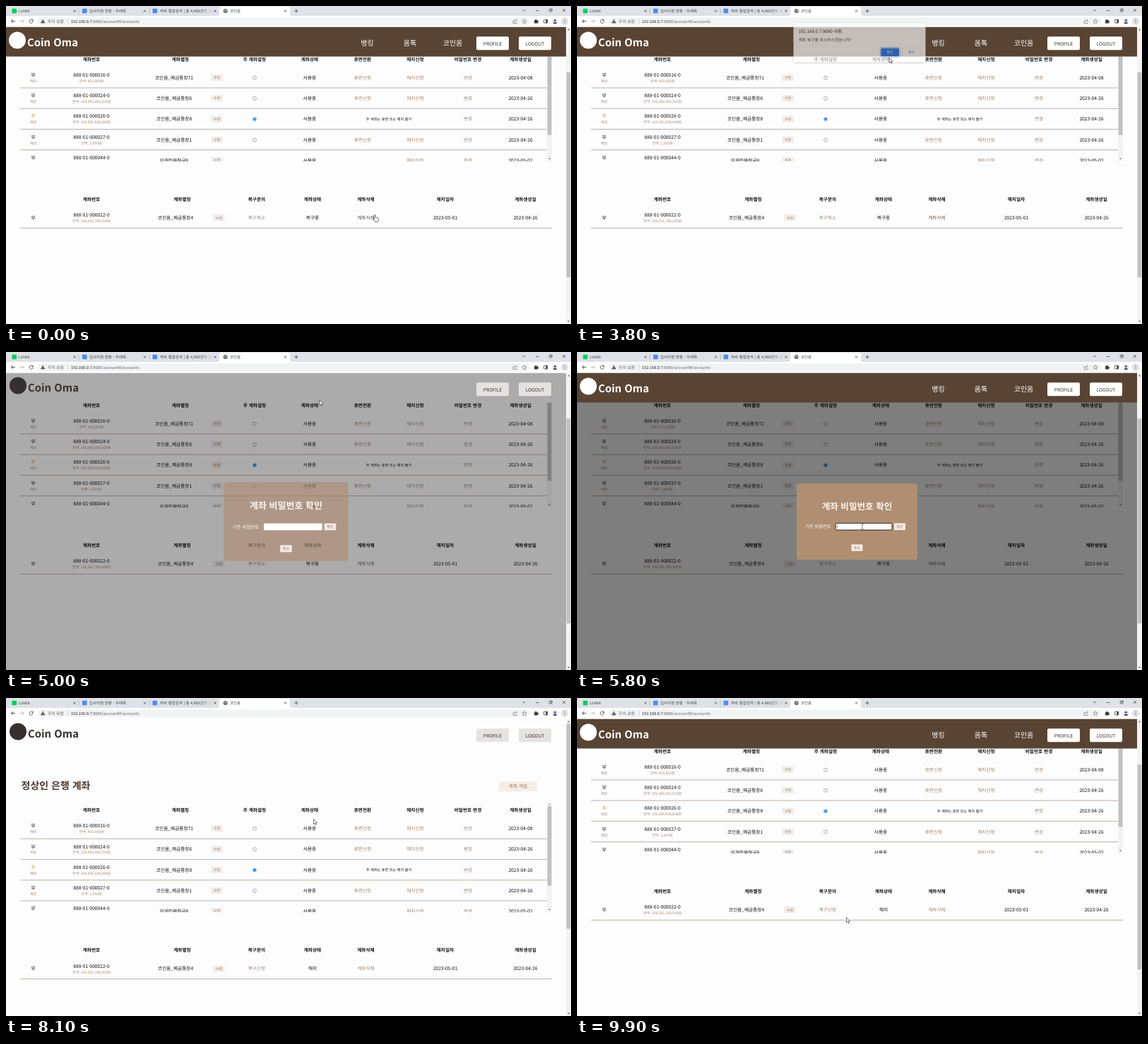
An HTML page for the animation above (10000 ms loop, 800x450 px).

```html
<!DOCTYPE html>
<html lang="ko">
<head>
<meta charset="utf-8">
<title>코인옴</title>
<style>
html, body { margin: 0; width: 100%; height: 100%; overflow: hidden; background: #fff; }
svg { display: block; width: 100%; height: 100%; }
text { font-family: "Noto Sans CJK KR", "Noto Sans KR", "Noto Sans CJK", "Noto Sans", sans-serif;
  text-rendering: geometricPrecision; white-space: pre; }
</style>
</head>
<body>
<svg id="stage" viewBox="0 0 800 450"></svg>
<script>
const LOOP = 10000, FRAME = 100;
const BROWN = '#a5866a', INK = '#111', SCROLL_END = 83.3;

// ---- markup helpers ----
const text = (x, y, s, size = 6.67, fill = INK, weight = 400, anchor = 'middle', id = '') =>
  `<text ${id && `id="${id}"`} x="${x}" y="${y + size * 0.37}" font-size="${size}" fill="${fill}" font-weight="${weight}" text-anchor="${anchor}">${s}</text>`;
const left = (x, y, s, size, fill, weight = 400, id = '') => text(x, y, s, size, fill, weight, 'start', id);
const rect = (x, y, w, h, fill, r = 0, more = '') =>
  `<rect x="${x}" y="${y}" width="${w}" height="${h}" rx="${r}" fill="${fill}" ${more}/>`;
const line = (d, color, width = 0.8, more = '') =>
  `<path d="${d}" fill="none" stroke="${color}" stroke-width="${width}" ${more}/>`;
const solid = (d, color) => `<path d="${d}" fill="${color}"/>`;
const group = (id, body, more = '') => `<g id="${id}" ${more}>${body}</g>`;
const heads = (y, list) => list.map(([x, s]) => text(x, y, s, 6.67, INK, 700)).join('');
const cross = (x, y, r, color = '#3c4043') =>
  line(`M${x - r} ${y - r}l${2 * r} ${2 * r}M${x + r} ${y - r}l${-2 * r} ${2 * r}`, color, 0.7);
const chip = (x, y) => rect(x - 8.3, y - 4.6, 16.6, 9.2, '#f3ece6', 1.5) + text(x, y, '수정', 5, '#94795f');

// ---- browser frame ----
function browser() {
  const gray = '#5f6368';
  let s = rect(0, 0, 800, 14, '#dee1e6') + rect(0, 14, 800, 15.5, '#fff');
  s += solid('M299 14q3 0 3-3V4q0-3 3-3h94q3 0 3 3v7q0 3 3 3z', '#fff');
  s += rect(8.5, 3.7, 6.6, 6.6, '#03cf5d', 0.8) + left(18, 7, 'LUNEK', 5, '#3c4043');
  s += rect(108, 3.7, 6.6, 6.6, '#4d8bf0', 0.8) + left(118, 7, '입사지원 현황 - 두레목', 5.5, '#3c4043');
  s += rect(207.5, 3.7, 6.6, 6.6, '#4d8bf0', 0.8) + left(218, 7, '자바 통합검색 | 총 4,403건의 검', 5.5, '#3c4043');
  s += rect(277, 2, 16, 11, 'url(#fadeGray)');
  s += group('globe', `<circle cx="310.7" cy="7" r="3" fill="${gray}"/>` +
    line('M308.6 5.6l2 .6.3 1.2-1.4 1M312 4.8l-.4 1.3 1.5.9', '#fff', 0.6));
  s += left(317, 7, '코인옴', 5.5, '#3c4043', 400, 'tabTitle') + rect(377, 2, 16, 11, 'url(#fadeWhite)');
  s += [97, 196.5, 296, 395.5].map(x => cross(x, 7, 1.6)).join('');
  s += [103, 203].map(x => line(`M${x} 3.5v7`, '#90959b', 0.5)).join('');
  s += line('M408.5 7h5M411 4.5v5', '#3c4043', 0.8);
  s += line('M731 5l2 2 2-2M750 6.5h4.5', '#333', 0.7) + line('M769.2 5h3v3h-3zM770.2 5V4h3v3h-1', '#333', 0.6) + cross(790, 6, 2, '#333');
  s += rect(45, 16.2, 697, 11, '#f1f3f4', 5.5);
  s += line('M13 21.5H7.5M10 19l-2.5 2.5L10 24', '#4a4d51', 0.9) + line('M19.5 21.5H25M22.5 19l2.5 2.5-2.5 2.5', '#b4b7ba', 0.9);
  s += group('reload', line('M37.7 20a2.6 2.6 0 1 0 .5 2.2', '#4a4d51', 0.9) + solid('M38.5 18.5v2.7h-2.7z', '#4a4d51'));
  s += group('stop', cross(35.7, 21.5, 2.2, '#4a4d51'));
  s += solid('M52.2 18.6l3.2 5.6H49z', '#4a4d51') + line('M52.2 20.5v1.7M52.2 22.8v.7', '#fff', 0.6);
  s += left(59, 21.6, '주의 요함', 5.8, gray) + line('M88 18v7', '#bdc1c6', 0.5);
  s += `<text x="92" y="23.6" font-size="5.6" fill="${gray}"><tspan fill="#202124">192.168.0.7</tspan><tspan id="path"></tspan></text>`;
  s += line('M719.5 20.5h-1.3v4h5v-1.5M719.8 22.7q.4-2.6 3.2-2.6M721.8 18.6l1.6 1.5-1.6 1.5', gray, 0.6);
  s += line('M734 18.6l.9 2 2.2.2-1.7 1.5.5 2.2-1.9-1.2-1.9 1.2.5-2.2-1.7-1.5 2.2-.2z', gray, 0.6);
  s += rect(748, 20, 5, 4.6, '#3c4043', 0.6) + `<circle cx="750.3" cy="19.8" r="1.1" fill="#3c4043"/><circle cx="753.2" cy="22.3" r="1.1" fill="#3c4043"/>`;
  s += rect(761.6, 19.2, 5, 4.8, 'none', 0.4, 'stroke="#3c4043" stroke-width=".8"') + rect(764.3, 19.2, 2.4, 4.8, '#3c4043');
  s += `<circle cx="777.3" cy="21.6" r="4" fill="#dfe2ee"/><circle cx="777.3" cy="20.4" r="1.4" fill="#3d4a78"/>` + solid('M774.4 24.2q2.9-3.4 5.8 0q-2.9 2-5.8 0z', '#3d4a78');
  s += '<circle cx="791" cy="21.5" r="5.4" fill="#e1e3e6"/>' + [19.5, 21.5, 23.5].map(y => `<circle cx="791" cy="${y}" r=".6" fill="#3c4043"/>`).join('');
  return s;
}

// ---- account page, laid out at its scrolled position ----
function accounts() {
  const rows = [
    ['16', '410,000', '코인옴_예금통장71', '04-08'],
    ['24', '100,000,092,503', '코인옴_예금통장6', '04-26'],
    ['26', '100,000,538,898', '코인옴_예금통장8', '04-26'],
    ['27', '1,000', '코인옴_예금통장1', '04-26'],
    ['44', '1,000', '이게진짜적금8', '05-02']
  ];
  let list = heads(75.2, [[119, ''], [121, '계좌번호'], [247, '계좌별칭'], [352, '주 계좌설정'], [430, '계좌상태'],
    [505, '휴면전환'], [579.5, '해지신청'], [654, '비밀번호 변경'], [728.5, '계좌생성일']]);
  rows.forEach(([no, sum, name, date], i) => {
    const y = 101.3 + i * 29.25, main = i === 2, last = i === 4;
    list += text(38.5, y - 3.8, main ? '주' : '부', 6.67, main ? '#e0862c' : INK) + text(38.5, y + 4.7, '예금', 5, BROWN);
    list += text(121, y - 3.8, `888-01-0000${no}-0`) + text(121, y + 4.7, `잔액: ${sum}원`, 5, BROWN);
    list += text(238, y, name) + chip(298.5, y) + text(430, y, '사용중');
    if (!last) {
      list += `<circle cx="352" cy="${y + 0.3}" r="2.5" fill="#fff" stroke="${main ? '#0b70e8' : '#767676'}" stroke-width=".6"/>`;
      list += line(`M20 ${y + 14.6}H766`, '#b5a99c', 0.9);
    }
    if (main) list += `<circle cx="352" cy="${y + 0.3}" r="1.7" fill="#0b70e8"/>` + text(542, y, '주 계좌는 휴면 또는 해지 불가', 5.2);
    else list += (last ? '' : text(505, y, '휴면신청', 6.67, BROWN)) + text(579.5, y, '해지신청', 6.67, BROWN);
    list += text(654, y, '변경', 6.67, BROWN) + text(728.5, y, '2023-' + date);
  });
  let s = left(21.5, 41, '정상인 은행 계좌', 14, '#4a382a', 700);
  s += rect(698, 35, 54, 14, '#f6ede6', 2) + text(725, 41.5, '계좌 개설', 6.67, '#94795f');
  s += group('list', list, 'clip-path="url(#listClip)"');
  s += rect(766, 64, 7, 156, '#f4f3f3') + rect(766.6, 70, 5.8, 112.5, '#c1c1c1');
  s += solid('M768.1 68l1.4-1.8 1.4 1.8z', '#777') + solid('M768.1 215.5l1.4 1.8 1.4-1.8z', '#505050');
  s += heads(273.6, [[121, '계좌번호'], [249.5, '계좌별칭'], [355, '복구문의'], [434, '계좌상태'],
    [509.5, '계좌삭제'], [622, '해지일자'], [735.5, '계좌생성일']]);
  s += text(38.5, 299.7, '부') + text(121, 296, '888-01-000022-0') + text(121, 304.4, '잔액: 100,291,780,000원', 5, BROWN);
  s += text(240, 299.7, '코인옴_예금통장4') + chip(301.5, 299.7);
  s += text(355, 299.7, '', 6.67, BROWN, 400, 'middle', 'ask') + text(434, 299.7, '', 6.67, INK, 400, 'middle', 'status');
  s += text(509.5, 299.7, '계좌삭제', 6.67, BROWN, 400, 'middle', 'remove');
  s += text(622, 299.7, '2023-05-01') + text(735.5, 299.7, '2023-04-26') + line('M20 314.3H773', '#b5a99c', 0.9);
  return s;
}

function header() {
  let s = rect(0, 29.5, 793, 42, '#594433', 0, 'id="bar"');
  s += `<g id="brand"><circle cx="16" cy="48.5" r="12"/>${left(30, 51, 'Coin Oma', 14.9, 'inherit', 700).replace('fill="inherit"', '')}</g>`;
  s += group('nav', [[511.5, '뱅킹'], [572, '옴톡'], [632.5, '코인옴']].map(([x, n]) => text(x, 52, n, 10, '#fff', 500)).join(''));
  s += [[666, 'PROFILE'], [726, 'LOGOUT']].map(([x, n]) =>
    rect(x, 43.3, 46, 19, '#fff', 2, 'class="pill"') + text(x + 23, 53.2, n, 6.67, '#3a332e', 500)).join('');
  return s;
}

function modal() {
  const button = (x, y, n) => rect(x, y, 16, 9.6, '#f1ebe6', 0.8) + text(x + 8, y + 4.8, n, 5, '#94704f');
  return rect(311, 186, 171, 108, '#b08e72', 4, 'id="modalBack"') + group('modalBody',
    text(396.5, 218, '계좌 비밀번호 확인', 12.6, '#f8f3ef', 700) +
    left(323, 247, '기존 비밀번호', 6.25, '#fff') +
    rect(366, 242.3, 80, 9.6, '#fff', 1, 'id="field" stroke="#1c1c1c"') +
    line('M368.2 244v6.2', '#111', 0.5, 'id="caret"') + left(368, 247.2, '', 6.5, '#111', 400, 'dots') +
    button(449, 242.3, '확인') + button(388.5, 272.2, '취소'));
}

const dialogs = [
  { id: 'ask1', bottom: 91, open: 1800, close: 3400, msg: '현재 계좌가 복구중 상태입니다. 계좌 복구를 취소하시겠습니까?' },
  { id: 'ask2', bottom: 83, open: 3700, close: 4745, msg: '계좌 복구를 취소하시겠습니까?' },
  { id: 'done', bottom: 83, open: 6840, close: 7550, msg: '계좌 복구가 취소되었습니다.', alert: true }
];
function dialog({ id, bottom, msg, alert }) {
  const y = bottom - 14, ok = alert ? 473.5 : 443.2;
  let s = rect(306.5, 27.5, 187, bottom - 27.5, '#fff', 2.5, 'filter="url(#shadow)"');
  s += left(313.5, 39.4, '192.168.0.7:8080 내용:', 6.2, '#202124') + left(313.5, 51, msg, 5.8, '#3c4043');
  s += rect(ok - 13.9, y - 6.9, 27.8, 13.8, 'none', 2, 'stroke="#8ab4f8" stroke-width=".9"');
  s += rect(ok - 12.8, y - 5.8, 25.6, 11.6, '#1a73e8', 1.5) + text(ok, y, '확인', 5, '#fff');
  if (!alert) s += rect(460.4, y - 6, 26.2, 12, '#fff', 1.5, 'stroke="#dadce0" stroke-width=".5"') + text(473.5, y, '취소', 5, '#1a73e8');
  return group(id, s);
}

const cursors =
  group('arrow', '<path d="M0 0v7.2l1.7-1.5 1.1 2.5 1.2-.5-1.1-2.5h2.2z" fill="#fff" stroke="#222" stroke-width=".6"/>') +
  group('hand', '<path d="M-.7 0q.9-.7 1.5.2v3.5l3.4.8q1.1.4.9 1.6l-.8 3.9h-4.5l-2.6-3.5q-.3-1.2 1.1-.7l1 .8z" fill="#fff" stroke="#222" stroke-width=".6"/>') +
  group('beam', line('M-1.4-3.6q1.4 0 1.4.7V3q0 .7-1.4.7M1.4-3.6Q0-3.6 0-2.9M0 3q0 .7 1.4.7', '#222', 0.6));

const fade = (id, c) => `<linearGradient id="${id}"><stop offset="0" stop-color="${c}" stop-opacity="0"/><stop offset="1" stop-color="${c}"/></linearGradient>`;
stage.innerHTML = `<defs>${fade('fadeGray', '#dee1e6')}${fade('fadeWhite', '#fff')}
  <clipPath id="pageClip">${rect(0, 71.5, 793, 379, '#000')}</clipPath>
  <clipPath id="listClip">${rect(0, 64, 766, 156, '#000')}</clipPath>
  <filter id="shadow" x="-5%" y="-10%" width="110%" height="125%"><feDropShadow dx="0" dy=".8" stdDeviation="1" flood-opacity=".4"/></filter></defs>` +
  rect(0, 0, 800, 450, '#fefdfe') +
  group('site',
    `<g clip-path="url(#pageClip)">${group('page', accounts())}</g>` +
    rect(0, 29.5, 793, 421, '#000', 0, 'id="shade"') + header() + group('modal', modal()) +
    rect(793, 29.5, 7, 421, '#f3f3f3') + rect(793.6, 94, 5.8, 290, '#c1c1c1', 0, 'id="thumb"') +
    solid('M795 34.2l1.5-2 1.5 2z', '#505050') + solid('M795 445.5l1.5 2 1.5-2z', '#505050')) +
  browser() + dialogs.map(dialog).join('') + group('pointer', cursors);

// ---- motion tables: [time, values...] ----
const moves = [
  [0, 522.5, 295.5], [100, 526, 298], [200, 522, 299], [400, 509.5, 297], [1100, 509.5, 297],
  [1600, 357, 297], [1900, 357, 297], [2300, 445, 59], [2600, 442, 73], [3800, 442, 73],
  [4400, 444, 68], [5000, 444, 68], [5700, 404, 247], [6300, 404, 247], [6600, 456, 248.5],
  [7000, 456, 248.5], [7450, 473, 66], [7800, 473, 66], [8600, 373, 347], [8900, 373, 347],
  [9600, 381.5, 310.5]
];
const kinds = [[0, 'hand'], [1200, 'arrow'], [1600, 'hand'], [1900, 'arrow'], [5600, 'beam'], [6400, 'arrow']];
const scrolls = [[0, SCROLL_END], [7799, SCROLL_END], [7800, 0], [8500, 0], [8650, SCROLL_END / 2], [8848, SCROLL_END / 2], [9000, SCROLL_END]];
const solidity = [[4600, 1], [4700, 0], [5100, 0], [5700, 1], [7799, 1], [7800, 0], [8500, 0], [8800, 1]];
const opening = [[4740, 0], [4800, 0.15], [4900, 0.4], [5000, 0.65], [5100, 0.85], [5250, 1]];

function at(keys, t) {
  const n = keys.findIndex(k => k[0] > t);
  if (n === 0) return keys[0].slice(1);
  if (n < 0) return keys[keys.length - 1].slice(1);
  const a = keys[n - 1], b = keys[n], p = (t - a[0]) / (b[0] - a[0]);
  return a.slice(1).map((v, i) => v + (b[i + 1] - v) * p);
}
const clamp = v => Math.max(0, Math.min(1, v));
const $ = id => document.getElementById(id);
const set = (id, name, value) => $(id).setAttribute(name, value);
const show = (id, on) => set(id, 'display', on ? 'inline' : 'none');
const say = (id, s) => { if ($(id).textContent !== s) $(id).textContent = s; };
const mix = (a, b, p) => `rgb(${a.map((v, i) => Math.round(v + (b[i] - v) * p))})`;
const pills = document.querySelectorAll('.pill');

function draw(t) {
  const loading = t >= 6800 && t < 7800, restored = t >= 7800;

  show('site', !loading);
  show('globe', !loading);
  show('reload', !loading);
  show('stop', loading);
  say('tabTitle', loading ? '192.168.0.7:8080/accountM/acco' : '코인옴');
  set('tabTitle', 'font-size', loading ? 5 : 5.5);
  say('path', ':8080/accountM/accounts' + (loading ? '_update?ac_seq=8880100000220&upCat=복구취소' : ''));

  const [scroll] = at(scrolls, t);
  set('page', 'transform', `translate(0 ${SCROLL_END - scroll})`);
  set('thumb', 'y', 94 - (SCROLL_END - scroll) * 0.69);
  say('ask', restored ? '복구신청' : '복구취소');
  say('status', restored ? '해지' : '복구중');
  set('remove', 'fill', restored ? BROWN : t < 1200 ? '#5c4a3a' : '#75624f');

  const [h] = at(solidity, t);
  set('bar', 'opacity', h);
  set('nav', 'opacity', h);
  set('brand', 'fill', mix([55, 48, 45], [255, 255, 255], h));
  set('brand', 'transform', `translate(${1 - h} ${h - 1})`);
  pills.forEach(p => p.setAttribute('fill', mix([229, 226, 225], [255, 255, 255], h)));

  const k = t < 6800 ? at(opening, t)[0] : 0, size = 1 + 0.095 * (1 - k);
  set('shade', 'opacity', k * 0.5);
  show('modal', k > 0);
  set('modal', 'transform', `translate(396.5 240) scale(${size}) translate(-396.5 -240)`);
  set('modalBack', 'opacity', k);
  set('modalBody', 'opacity', clamp(k * 5));
  set('field', 'stroke-width', k < 1 ? 0 : 0.9);
  const typed = Math.max(0, Math.min(4, Math.floor((t - 5900) / 100)));
  say('dots', '•'.repeat(typed));
  show('caret', k === 1 && !typed && t % 1000 >= 300);

  for (const d of dialogs) {
    const p = Math.min(clamp((t - d.open) / 200), 1 - clamp((t - d.close) / 200));
    show(d.id, p > 0);
    set(d.id, 'opacity', Math.min(1, p * 1.3));
    set(d.id, 'transform', `translate(0 ${-7 * (1 - p)})`);
  }

  const kind = kinds.filter(e => e[0] <= t).pop()[1];
  for (const id of ['arrow', 'hand', 'beam']) show(id, id === kind);
  set('pointer', 'transform', `translate(${at(moves, t)})`);
}

const start = performance.now();
function tick() {
  const t = (performance.now() - start) % LOOP;
  draw(Math.floor(t / FRAME) * FRAME);
  requestAnimationFrame(tick);
}
draw(0);
requestAnimationFrame(tick);
</script>
</body>
</html>
```
